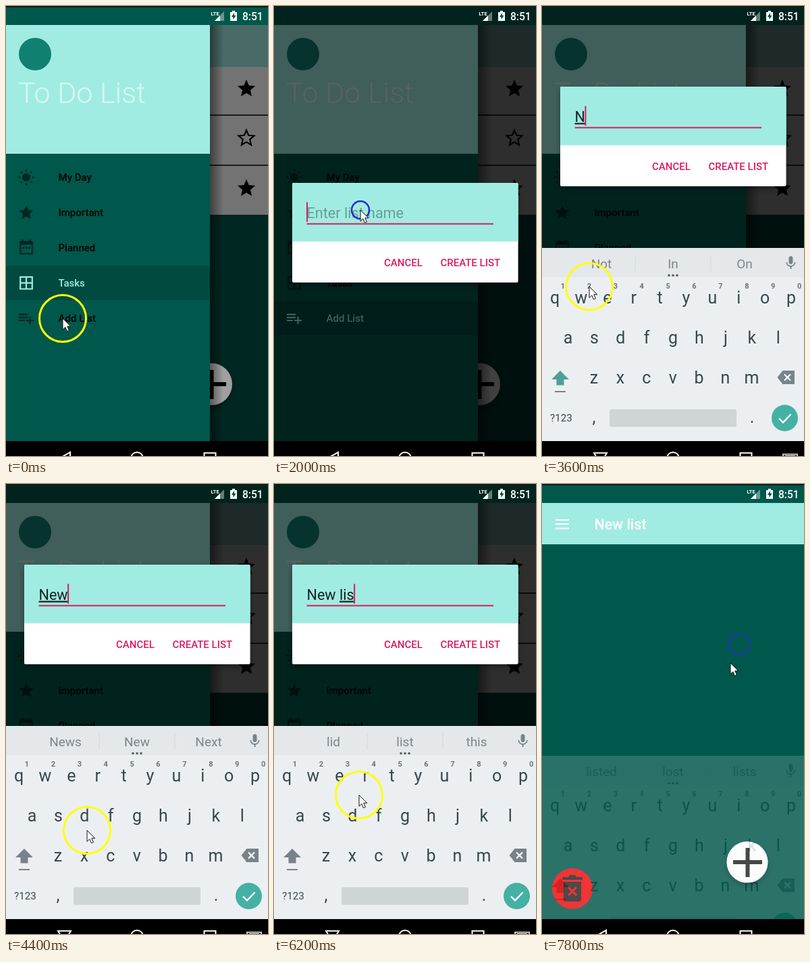
Animation of 388 by 664 pixels, one loop 8000 ms. Source, as an HTML page:

```html
<!DOCTYPE html>
<html lang="en">
<head>
<meta charset="utf-8">
<title>To Do List</title>
<style>
html, body { margin: 0; width: 100%; height: 100%; overflow: hidden; background: #000; }
svg { display: block; width: 388px; height: 664px; }
text { font-family: Roboto, sans-serif; white-space: pre; }
.medium { font-weight: 500; font-size: 15px; }
.pink { fill: #d81b60; }
.keys text { fill: #37474f; text-anchor: middle; font-size: 25px; }
.keys .digit { font-size: 11px; font-weight: 700; fill: #6b7478; }
.keys .word { font-size: 19px; fill: #7b858a; }
.keys .small { font-size: 15.2px; }
u, .compose { text-decoration: underline; text-decoration-thickness: 1px; }
</style>
</head>
<body>
<svg viewBox="0 0 388 664">
  <defs>
    <linearGradient id="edge">
      <stop offset="0" stop-opacity=".45"/><stop offset="1" stop-opacity="0"/>
    </linearGradient>
    <filter id="shadow" x="-20%" y="-20%" width="140%" height="150%">
      <feDropShadow dx="0" dy="4" stdDeviation="4" flood-opacity=".35"/>
    </filter>
    <path id="star" d="M12 17.27L18.18 21l-1.64-7.03L22 9.24l-7.19-.61L12 2 9.19 8.63 2 9.24l5.46 4.73L5.82 21z"/>
    <path id="plus" d="M283 555h18.500v-18h6v18H326v6h-18.500v19h-6v-19H283z"/>
  </defs>

  <rect width="388" height="664" fill="#00574b"/>

  <g id="home">
    <rect y="28" width="388" height="62" fill="#a0ece2"/>
    <rect y="90" width="388" height="218" fill="#fff"/>
    <path d="M302 161h86M302 235h86" stroke="#000" stroke-width="1.5"/>
    <use href="#star" transform="translate(340.400 106) scale(1.3)"/>
    <use href="#star" transform="translate(342.300 181) scale(1.14)" fill="none" stroke="#000" stroke-width="1.9"/>
    <use href="#star" transform="translate(340.400 253) scale(1.3)"/>
    <rect y="28" width="388" height="614" fill-opacity=".55"/>
    <circle cx="304" cy="558" r="31" fill="#a0a0a0" filter="url(#shadow)"/>
    <use href="#plus"/>
    <rect x="302" y="28" width="20" height="614" fill="url(#edge)"/>
    <rect y="28" width="302" height="614" fill="#00574b"/>
    <rect y="28" width="302" height="190" fill="#a0ece2"/>
    <circle cx="43" cy="71" r="24" fill="#108070"/>
    <text x="18" y="143" font-size="43" font-weight="300" fill="#d9f8f3">To Do List</text>
    <rect id="highlight" width="302" height="51" fill="#004a40"/>
    <g id="menu"></g>
  </g>

  <g id="listScreen">
    <rect y="28" width="388" height="61" fill="#a0ece2"/>
    <path d="M20 53h20M20 59h20M20 65.500h20" stroke="#fff" stroke-width="2.200"/>
    <text x="77.500" y="67" font-size="21.400" font-weight="500" fill="#fff">New list</text>
    <circle cx="304" cy="558" r="30.500" fill="#fff" filter="url(#shadow)"/>
    <use href="#plus" fill="#222"/>
    <circle cx="45" cy="597" r="30" fill="#f00c0c"/>
    <path d="M30 580h9l2-3h8l2 3h9v4H30zM32 587h26v26q0 3-3 3H35q-3 0-3-3z" fill="#2b2422"/>
    <path d="M39 595l12 12M51 595l-12 12" stroke="#f00c0c" stroke-width="3"/>
  </g>

  <rect id="dim" width="388" height="642"/>
  <rect width="388" height="2" fill="#101a18"/>

  <g fill="#fff">
    <text x="303.500" y="13.500" font-size="7.500" font-weight="700" textLength="">LTE</text>
    <path d="M323 8v14h-14z" fill-opacity=".4"/>
    <path d="M317 14v8h-8z"/>
    <path d="M335 7h4v2h3v13h-10V9h3z"/>
    <path d="M338 10l-4 6h2.500v4l4-6H338z" fill="#00463c"/>
    <text x="350" y="20.500" font-size="15.600" font-weight="500">8:51</text>
  </g>

  <g id="dialog">
    <rect x="27" y="261" width="334.500" height="147" rx="2" fill="#fff" filter="url(#shadow)"/>
    <path d="M27 347.500V263q0-2 2-2h330.500q2 0 2 2v84.500z" fill="#a0ece2"/>
    <text id="hint" x="48.500" y="312.500" font-size="21.600" fill="#6b9d97">Enter list name</text>
    <text id="entry" x="48.500" y="312.500" font-size="21.600" fill="#17211f"><tspan id="done"></tspan><tspan id="compose" class="compose"></tspan></text>
    <rect x="48.500" y="320.500" width="276.500" height="2" class="pink"/>
    <rect id="caret" y="289.500" width="2" height="29" class="pink"/>
    <text x="163" y="384" class="medium pink">CANCEL</text>
    <text x="246.500" y="384" class="medium pink">CREATE LIST</text>
  </g>

  <g id="keyboard" class="keys">
    <rect y="357" width="388" height="290" fill="#eceff1"/>
    <rect y="357" width="388" height="43" fill="#e4e8ea"/>
    <path d="M138 368v24M250 368v24" stroke="#d3d8da"/>
    <g id="dots" fill="#546066"><circle cx="188" cy="397.500" r="1.800"/><circle cx="194" cy="397.500" r="1.800"/><circle cx="200" cy="397.500" r="1.800"/></g>
    <path transform="translate(356.500 367)" fill="#78838a" d="M12 14c1.660 0 3-1.340 3-3V5c0-1.660-1.340-3-3-3S9 3.340 9 5v6c0 1.660 1.340 3 3 3zm5.300-3c0 3-2.540 5.100-5.300 5.100S6.700 14 6.700 11H5c0 3.410 2.720 6.230 6 6.720V21h2v-3.280c3.280-.480 6-3.300 6-6.720z"/>
    <path id="shift" d="M27 538l13 13h-7.500v8.500h-11V551H14z"/>
    <path d="M19 569h16" stroke="#78838a" stroke-width="2"/>
    <path d="M348.500 548l8-10H374v20h-17.500z" fill="#78838a"/>
    <path d="M359 543.500l9 9M368 543.500l-9 9" stroke="#fff" stroke-width="2.200"/>
    <text x="28.500" y="613" class="small">?123</text>
    <text x="77" y="615">,</text>
    <text x="311" y="615">.</text>
    <rect x="100" y="595" width="188" height="26" rx="3" fill="#cfd4d7"/>
    <circle cx="359.500" cy="608" r="19.500" fill="#45b0a4"/>
    <path d="M351 608.500l6 6 11.500-12" fill="none" stroke="#fff" stroke-width="2.400"/>
  </g>

  <rect y="642" width="388" height="22"/>
  <g fill="none" stroke="#fff" stroke-width="2">
    <path id="back" d="M95 658.500v18L79 667.500z"/>
    <path id="hide" d="M77 659.500h19l-9.500 16z"/>
    <circle cx="194" cy="667.500" r="9"/>
    <path d="M293.500 659.500h17v17h-17z"/>
    <path id="keyIcon" d="M357 661.500h21v12h-21zM360 664h15" stroke="#ccc"/>
  </g>

  <circle id="ripple" fill="none" stroke="#2a2ad0" stroke-width="2.500"/>
  <g id="pointer">
    <circle id="halo" r="34.500" fill="none" stroke="#ffff0a" stroke-width="3"/>
    <path d="M0 0v16.500l3.800-3.600 2.600 6 3-1.300-2.600-5.800h5z" fill="#fff" stroke="#111" stroke-width="1"/>
  </g>
</svg>
<script>
const STEP = 200, LOOP = 8000;
const ui = {};
document.querySelectorAll('[id]').forEach(node => ui[node.id] = node);

function add(parent, tag, attrs, content = '') {
  const node = document.createElementNS('http://www.w3.org/2000/svg', tag);
  for (const name in attrs) node.setAttribute(name, attrs[name]);
  node.textContent = content;
  return parent.appendChild(node);
}
const set = (node, attrs) => { for (const name in attrs) node.setAttribute(name, attrs[name]); };
const show = (node, on) => { node.style.display = on ? '' : 'none'; };

// Drawer entries, drawn on a 24-unit icon grid
const rays = Array.from({ length: 8 }, (_, i) => {
  const a = i * Math.PI / 4, at = r => `${12 + r * Math.cos(a)} ${12 + r * Math.sin(a)}`;
  return `M${at(8)}L${at(10.6)}`;
}).join('');
const menu = [
  ['My Day', 'M12 6.500a5.500 5.500 0 1 0 .01 0z', rays],
  ['Important', ui.star.getAttribute('d')],
  ['Planned', 'M5 3h1V1h2v2h8V1h2v2h1q2 0 2 2v14q0 2-2 2H5q-2 0-2-2V5q0-2 2-2zm0 5v11h14V8zm2 3h2.500v2.500H7zm4 0h2.500v2.500H11zm4 0h2.500v2.500H15z'],
  ['Tasks', 'M3 3v18h18V3zm8 16H5v-6h6zm0-8H5V5h6zm8 8h-6v-6h6zm0-8h-6V5h6z'],
  ['Add List', 'M14 10H2v2h12zm0-4H2v2h12zm4 8v-4h-2v4h-4v2h4v4h2v-4h4v-2h-4zM2 16h8v-2H2z']
].map(([label, shape, lines], i) => {
  const y = 253 + 52 * i;
  const icon = add(ui.menu, 'g', { transform: `translate(16.8 ${y - 13.5}) scale(1.1)` });
  add(icon, 'path', { d: shape, 'fill-rule': 'evenodd' });
  if (lines) add(icon, 'path', { d: lines, stroke: '#000', 'stroke-width': 2 });
  return { icon, text: add(ui.menu, 'text', { x: 77.5, y: y + 5, class: 'medium' }, label) };
});

// Keyboard
const PITCH = 38.9, keys = [];
[['qwertyuiop', 19, 439], ['asdfghjkl', 38.5, 498], ['zxcvbnm', 77, 557]].forEach(([row, x, y]) =>
  [...row].forEach((letter, i) =>
    keys.push({ letter, node: add(ui.keyboard, 'text', { x: x + PITCH * i, y }) })));
[...'1234567890'].forEach((digit, i) =>
  add(ui.keyboard, 'text', { x: 31 + PITCH * i, y: 417, class: 'digit' }, digit));
const words = [88, 194, 300].map(x => add(ui.keyboard, 'text', { x, y: 387, class: 'word' }));

// time, finished text, word being composed, suggestions
const typing = [
  [800, '', '', ''],
  [3200, '', 'N', 'Not In On'],
  [4000, '', 'Ne', 'Be Need Me'],
  [4400, '', 'New', 'News New Next'],
  [4800, 'New ', '', ''],
  [5200, 'New ', 'l', ''],
  [5600, 'New ', 'li', 'like I live'],
  [6000, 'New ', 'lis', 'lid list this'],
  [6600, 'New ', 'list', 'listed lost lists']
];
// time, x, y
const path = [
  [0, 84, 461], [400, 94, 458], [1200, 94, 458], [1800, 128, 301], [2200, 128, 301],
  [2800, 271, 547], [3200, 268, 547], [3600, 70, 414], [3800, 94, 428], [4000, 94, 428],
  [4200, 60, 430], [4600, 180, 592], [5000, 345, 488], [5200, 306, 456], [5400, 291, 430],
  [5800, 78, 488], [6000, 78, 488], [6400, 174, 430], [6600, 174, 430],
  [7200, 291, 236], [7400, 291, 236], [7800, 279, 264]
];
// time, ring radius
const clicks = [[800, 11], [2000, 13], [3000, 11], [3800, 11], [4200, 11], [4600, 11],
  [5000, 11], [5400, 11], [5800, 11], [6400, 11], [7400, 10]];

function pointerAt(t) {
  const next = path.findIndex(p => p[0] > t);
  if (next < 0) return path.at(-1).slice(1);
  const [t0, x0, y0] = path[next - 1], [t1, x1, y1] = path[next];
  const k = (t - t0) / (t1 - t0);
  return [x0 + (x1 - x0) * k, y0 + (y1 - y0) * k];
}

function drawMenu(t) {
  const selected = t < 600 ? 3 : 4;
  set(ui.highlight, { y: 383 + 52 * (selected - 3) });
  menu.forEach(({ icon, text }, i) => {
    const on = i === selected;
    set(icon, { fill: on ? '#a0ece2' : '#000', opacity: on ? 1 : .55 });
    set(text, { fill: on ? '#a0ece2' : '#000' });
  });
}

function drawDialog(t, typed) {
  const [since, done, compose] = typed;
  show(ui.dialog, t >= 800 && t < 7800);
  set(ui.dialog, {
    opacity: t < 1000 ? .87 : t < 7600 ? 1 : .4,
    transform: `translate(0 ${t < 2400 ? 0 : -142})`
  });
  show(ui.hint, !(done + compose));
  ui.done.textContent = done;
  ui.compose.textContent = compose;
  const width = done + compose ? ui.entry.getComputedTextLength() : 0;
  set(ui.caret, { x: 48 + width });
  show(ui.caret, (t - since) % 1000 < 600);
}

function drawKeyboard(t, typed) {
  const moving = t < 2400 || t >= 7800;
  show(ui.keyboard, t >= 2200);
  set(ui.keyboard, {
    transform: `translate(0 ${moving ? 44 : 0})`,
    opacity: t < 2400 ? .6 : t < 7800 ? 1 : .18
  });
  const upper = t < 3200;
  keys.forEach(({ letter, node }) => node.textContent = upper ? letter.toUpperCase() : letter);
  set(ui.shift, { fill: t < 3800 ? '#4f9f97' : '#78838a' });
  const hints = typed[3].split(' ');
  words.forEach((node, i) => node.textContent = hints[i] || '');
  show(ui.dots, typed[3]);
}

function drawPointer(t) {
  const [x, y] = pointerAt(t);
  set(ui.pointer, { transform: `translate(${x} ${y})` });
  const click = clicks.find(c => c[0] === t);
  const leaving = t > 7400;
  show(ui.halo, !click && !leaving);
  show(ui.ripple, click || leaving);
  set(ui.ripple, leaving
    ? { cx: 292, cy: 236, r: 15.5, opacity: .7 }
    : { cx: x, cy: y, r: click ? click[1] : 0, opacity: 1 });
}

function draw(t) {
  const typed = typing.findLast(row => row[0] <= t) || typing[0];
  show(ui.home, t < 7600);
  show(ui.listScreen, t >= 7600);
  set(ui.dim, { opacity: t < 800 || t >= 7800 ? 0 : t < 1000 ? .17 : t < 7600 ? .6 : .3 });
  const canHide = (t >= 600 && t <= 1200) || (t >= 2200 && t < 7800);
  show(ui.hide, canHide);
  show(ui.keyIcon, canHide);
  show(ui.back, !canHide);
  drawMenu(t);
  drawDialog(t, typed);
  drawKeyboard(t, typed);
  drawPointer(t);
}

const start = performance.now();
let last = -1;
function tick() {
  const t = Math.floor((performance.now() - start) % LOOP / STEP) * STEP;
  if (t !== last) draw(last = t);
  requestAnimationFrame(tick);
}
tick();
</script>
</body>
</html>
```
